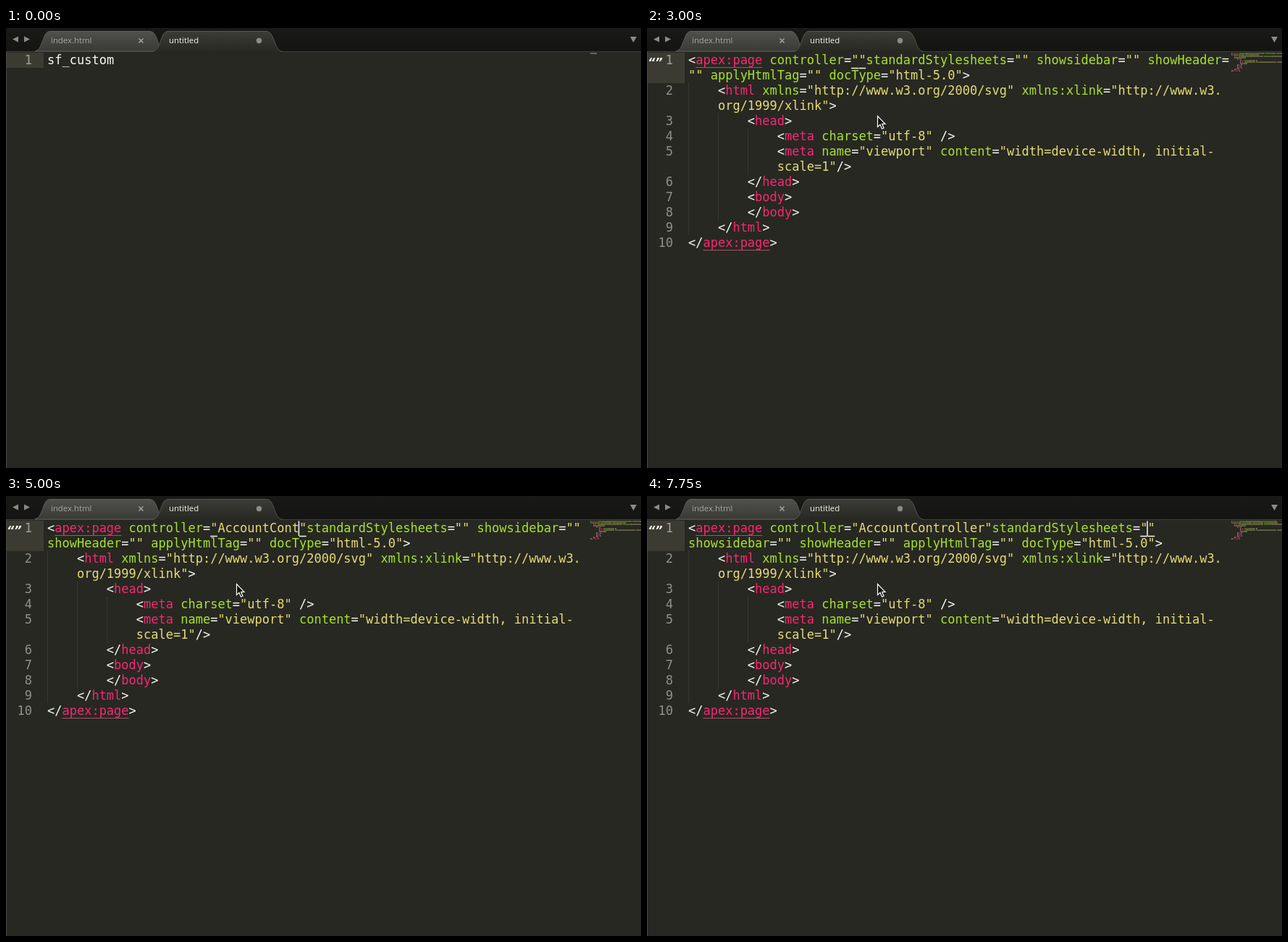
Write an HTML page that moves like this. It is 877 by 607 pixels and loops after 8000 ms.

```html
<!DOCTYPE html>
<html lang="en">
<head>
<meta charset="utf-8">
<title>Editor snippet</title>
<style>
  html, body { margin: 0; width: 100%; height: 100%; overflow: hidden; background: #272822; }
  svg { display: block; width: 877px; height: 607px; }
  .code text { font: 17px "DejaVu Sans Mono", monospace; white-space: pre; }
  .tab { font: 11.4px "Open Sans", sans-serif; }
</style>
</head>
<body>
<svg viewBox="0 0 877 607">
  <defs>
    <linearGradient id="bar" x2="0" y2="1">
      <stop stop-color="#191a17"/><stop offset="1" stop-color="#141512"/>
    </linearGradient>
    <linearGradient id="back" x2="0" y2="1">
      <stop stop-color="#50514d"/><stop offset="1" stop-color="#393a36"/>
    </linearGradient>
    <linearGradient id="front" x2="0" y2="1">
      <stop stop-color="#3b3c37"/><stop offset="1" stop-color="#272822"/>
    </linearGradient>
  </defs>
  <rect width="877" height="607" fill="#272822"/>
  <rect width="877" height="32" fill="url(#bar)"/>
  <path d="M0 32.5H877" stroke="#3d3e38"/>
  <path d="M.5 33V607" stroke="#484943"/>
  <path d="M40 32C47 30 48 24 52 14C55 6 57 4.500 62 4.500H197C203 4.500 205 7 208 14C212 24 212 30 219 32Z" fill="url(#back)" stroke="#5c5d58"/>
  <path d="M202 33C210 31 211 24 215 14C218 6 220 4.500 225 4.500H358C364 4.500 366 7 369 14C373 24 374 31 382 33Z" fill="url(#front)"/>
  <path d="M202 32.500C210 31 211 24 215 14C218 6 220 4.500 225 4.500H358C364 4.500 366 7 369 14C373 24 374 31 382 32.500" fill="none" stroke="#54554f"/>
  <g fill="#8b8c87">
    <path d="M9 15.500L17 11.500V19.500ZM33 15.500L25 11.500V19.500ZM862 12H871L866.500 20Z"/>
    <circle cx="349.500" cy="17.500" r="3.700"/>
  </g>
  <path d="M183.500 14.500L189.500 20.500M189.500 14.500L183.500 20.500" stroke="#a3a49f" stroke-width="1.500"/>
  <text class="tab" x="62" y="21" fill="#a5a6a1">index.html</text>
  <text class="tab" x="225" y="21" fill="#f4f4ef">untitled</text>
  <g class="code">
    <rect id="active" x="1" y="34" width="51" fill="#3c3b32"/>
    <g id="page"></g>
  </g>
  <path id="marks" stroke="#f8f8f2" stroke-width="1.500"/>
  <path id="caret" stroke="#f8f8f0" stroke-width="1.500"/>
  <text id="icon" x="1" y="53" fill="#f8f8f2" style="font:italic bold 16px 'DejaVu Sans',sans-serif">“”</text>
  <path id="mouse" d="M318.500 121.500V136.500L322 133.300L324.500 139L327 138L324.600 132.300H329Z" fill="#111" stroke="#fff" stroke-width="1.200"/>
</svg>
<script>
const LOOP = 8000, CHAR = 10.234, ROW = 21, LEFT = 57, TOP = 34, COLS = 73;
const WHITE = '#f8f8f2', PINK = '#f92672', GREEN = '#a6e22e', YELLOW = '#e6db74';
const $ = id => document.getElementById(id);
const colX = col => LEFT + col * CHAR;
const escapeXml = s => s.replace(/&/g, '&amp;').replace(/</g, '&lt;');

const snippet = name => [
  `<apex:page controller="${name}"standardStylesheets="" showsidebar="" showHeader="" applyHtmlTag="" docType="html-5.0">`,
  '    <html xmlns="http://www.w3.org/2000/svg" xmlns:xlink="http://www.w3.org/1999/xlink">',
  '        <head>',
  '            <meta charset="utf-8" />',
  '            <meta name="viewport" content="width=device-width, initial-scale=1"/>',
  '        </head>',
  '        <body>',
  '        </body>',
  '    </html>',
  '</apex:page>'
];

// [time, typed name (null before expansion), field, caret, quotes marked]
const steps = [
  [0, null, 0, 0, 0], [250, null, 0, 1, 0], [500, null, 0, 0, 0],
  [750, null, 0, 1, 0], [1000, null, 0, 0, 0],
  [1500, '', 0, 1, 0], [1750, '', 0, 1, 1], [2000, '', 0, 0, 1],
  [2500, '', 0, 1, 1], [3000, '', 0, 0, 1],
  [3250, 'Ac', 0, 1, 1], [3500, 'Acco', 0, 1, 1], [3750, 'Accoun', 0, 1, 1],
  [4000, 'Account', 0, 1, 1], [4250, 'Account', 0, 0, 1], [4500, 'AccountC', 0, 1, 1],
  [5000, 'AccountCont', 0, 1, 1], [5250, 'AccountContro', 0, 1, 1],
  [5500, 'AccountControll', 0, 1, 1], [5750, 'AccountControlle', 0, 1, 1],
  [6000, 'AccountController', 0, 1, 1], [6250, 'AccountController', 0, 0, 1],
  [6500, 'AccountController', 1, 1, 1], [7000, 'AccountController', 1, 0, 1],
  [7500, 'AccountController', 1, 1, 1]
];

// One colour per character
function paint(line) {
  const colours = Array(line.length).fill(WHITE);
  for (const m of line.matchAll(/"[^"]*"|(?<=<\/?)[\w:]+|[\w:]+(?==)/g)) {
    const before = line[m.index - 1];
    const colour = m[0][0] === '"' ? YELLOW : before === '<' || before === '/' ? PINK : GREEN;
    colours.fill(colour, m.index, m.index + m[0].length);
  }
  return colours;
}

// Soft wrap at the last gap that does not split a word
function wrap(line) {
  const indent = line.search(/\S/), rows = [];
  let from = 0, col = 0;
  while (line.length - from > COLS - col) {
    let to = from + COLS - col;
    while (/\w/.test(line[to - 1]) && /\w/.test(line[to])) to--;
    rows.push({ from, to, col });
    from = to;
    while (line[from] === ' ') from++;
    col = indent;
  }
  rows.push({ from, to: line.length, col });
  return rows;
}

// Coloured runs of visible text in one row
function runs(line, colours, { from, to, col }) {
  const list = [];
  for (let i = from; i < to; i++) {
    if (line[i] === ' ') continue;
    let end = i + 1;
    while (end < to && line[end] !== ' ' && colours[end] === colours[i]) end++;
    list.push({ text: line.slice(i, end), col: col + i - from, colour: colours[i] });
    i = end - 1;
  }
  return list;
}

function pageMarkup(lines) {
  let out = '', row = 0;
  const guide = (col, a, b) =>
    `<path d="M${Math.round(colX(col)) + .5} ${TOP + a * ROW}V${TOP + b * ROW}" stroke="#46473f" stroke-dasharray="1 1"/>`;
  if (lines.length > 1) out += guide(0, 2, 12) + guide(4, 4, 11) + guide(8, 5, 8);
  lines.forEach((line, n) => {
    const colours = paint(line);
    const number = n ? '#8f908a' : '#a09f94';
    out += `<text x="36" y="${TOP + 16 + row * ROW}" text-anchor="end" fill="${number}">${n + 1}</text>`;
    for (const part of wrap(line)) {
      const y = TOP + row * ROW;
      for (const { text, col, colour } of runs(line, colours, part)) {
        out += `<text x="${colX(col)}" y="${y + 16}" fill="${colour}">${escapeXml(text)}</text>`;
        out += `<rect x="${807 + col}" y="${TOP + .5 + row * 2}" width="${text.length}" height="1.200" fill="${colour}" opacity=".5"/>`;
        if (text === 'apex:page')
          out += `<path d="M${colX(col)} ${y + 20.5}h${9 * CHAR}" stroke="#a0526b"/>`;
      }
      row++;
    }
  });
  return out;
}

let shown;
function draw(t) {
  const step = steps.findLast(s => s[0] <= t);
  if (step === shown) return;
  shown = step;
  const [, name, field, caret, marked] = step;
  const expanded = name !== null;
  const lines = expanded ? snippet(name) : ['sf_custom'];
  $('page').innerHTML = pageMarkup(lines);
  $('active').setAttribute('height', ROW * wrap(lines[0]).length);

  const open = field ? lines[0].indexOf('""') : 22;
  const close = field ? open + 1 : open + 1 + (name || '').length;
  const caretCol = expanded ? close : lines[0].length;
  const dash = col => `M${colX(col)} 55.5h${CHAR - .5}`;
  $('marks').setAttribute('d', marked ? dash(open) + dash(close) : '');
  $('caret').setAttribute('d', caret ? `M${colX(caretCol) - .5} 34.5V55` : '');
  $('icon').setAttribute('visibility', marked ? 'visible' : 'hidden');
  $('mouse').setAttribute('visibility', t >= 750 ? 'visible' : 'hidden');
}

const start = performance.now();
function tick() {
  draw((performance.now() - start) % LOOP);
  requestAnimationFrame(tick);
}
tick();
</script>
</body>
</html>
```
